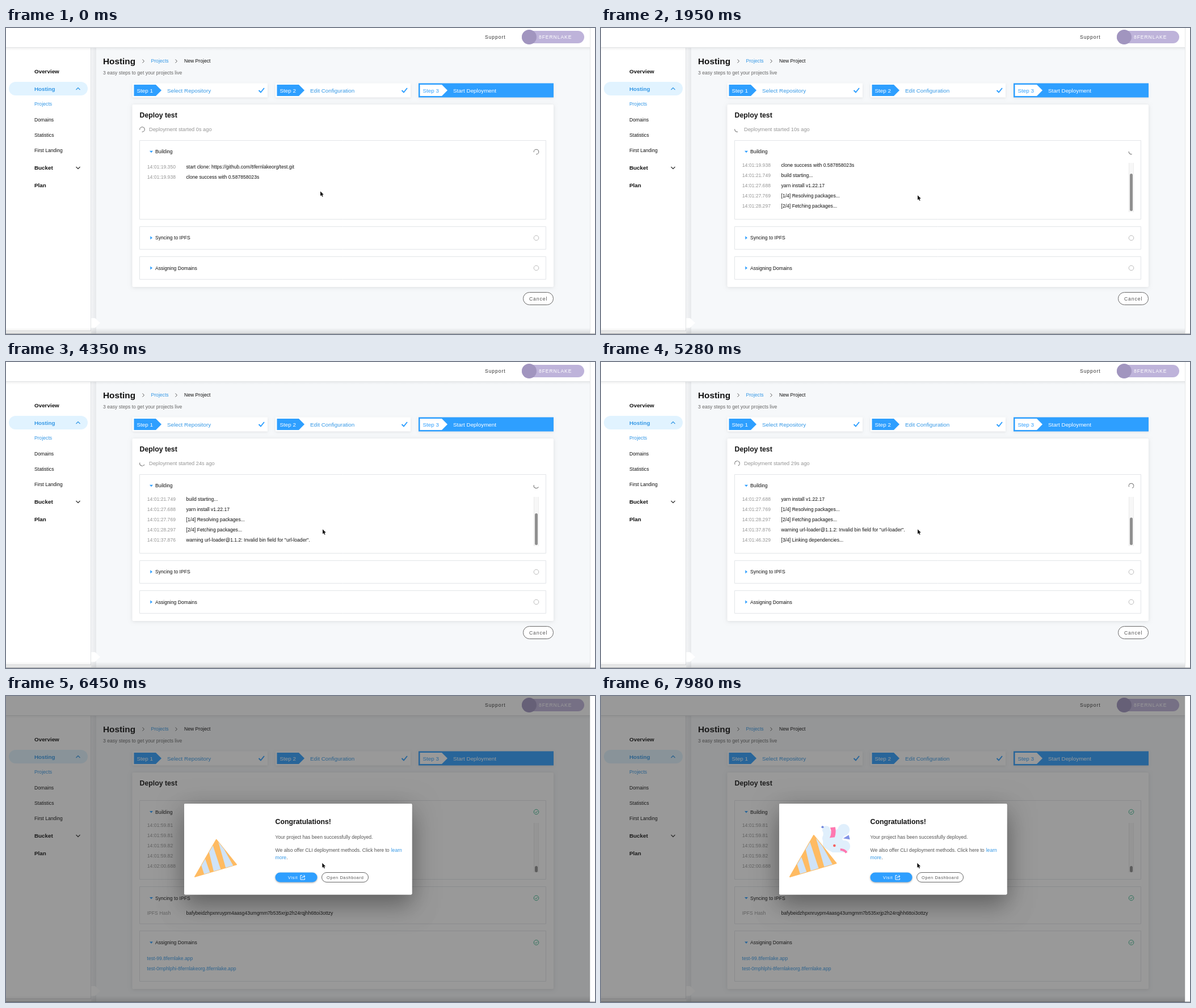
These frames come from a looping animation (1038x540 px, 8000 ms). An HTML page with a canvas:

```html
<!DOCTYPE html>
<html lang="en">
<head>
<meta charset="utf-8">
<title>Deployment</title>
<style>
html, body { margin: 0; width: 100%; height: 100%; overflow: hidden; background: #fff; }
canvas { display: block; width: 100%; height: 100%; }
</style>
</head>
<body>
<canvas id="stage" width="1038" height="540"></canvas>
<script>
const ctx = document.getElementById('stage').getContext('2d');
const LOOP = 8000, STEP = 30, SECOND = 180, DONE = 5550;
const BLUE = '#2e9fff', LINK = '#3598e6', INK = '#111', GREY = '#959595', RULE = '#e2e5e8', GREEN = '#35b58a';
const S = 8.62, M = 9.85, L = 12.3;

const LOG = [
  ['19.350', 'start clone: https://github.com/8fernlakeorg/test.git'],
  ['19.938', 'clone success with 0.587858023s'],
  ['21.749', 'build starting...'],
  ['27.688', 'yarn install v1.22.17'],
  ['27.769', '[1/4] Resolving packages...'],
  ['28.297', '[2/4] Fetching packages...'],
  ['37.876', 'warning url-loader@1.1.2: Invalid bin field for "url-loader".'],
  ['46.329', '[3/4] Linking dependencies...']
];
const LAST_TIMES = ['14:01:59.81', '14:01:59.81', '14:01:59.82', '14:01:59.82', '14:02:00.688'];

const clamp = v => Math.max(0, Math.min(1, v));
const smooth = v => v * v * (3 - 2 * v);

// y is the middle of the capitals
function text(s, x, y, { size = S, color = INK, bold = false, gap = 0 } = {}) {
  ctx.font = `${bold ? 'bold ' : ''}${size}px "Liberation Sans", Arial, sans-serif`;
  ctx.letterSpacing = gap + 'px';
  ctx.fillStyle = color;
  ctx.fillText(s, x, y + size * 0.36);
}

function rect(x, y, w, h, color) {
  ctx.fillStyle = color;
  ctx.fillRect(x, y, w, h);
}

function box(x, y, w, h) {
  ctx.strokeStyle = RULE;
  ctx.lineWidth = 1;
  ctx.strokeRect(x, y, w, h);
}

function round(x, y, w, h, r, fill, stroke) {
  ctx.beginPath();
  ctx.roundRect(x, y, w, h, r);
  if (fill) { ctx.fillStyle = fill; ctx.fill(); }
  if (stroke) { ctx.strokeStyle = stroke; ctx.lineWidth = 1; ctx.stroke(); }
}

function path(points) {
  ctx.beginPath();
  points.forEach(([x, y], i) => i ? ctx.lineTo(x, y) : ctx.moveTo(x, y));
}

function poly(points, color) {
  path(points);
  ctx.closePath();
  ctx.fillStyle = color;
  ctx.fill();
}

function line(points, color, width = 1) {
  path(points);
  ctx.strokeStyle = color;
  ctx.lineWidth = width;
  ctx.stroke();
}

function disc(x, y, r, color) {
  ctx.beginPath();
  ctx.arc(x, y, r, 0, Math.PI * 2);
  ctx.fillStyle = color;
  ctx.fill();
}

function ring(x, y, color) {
  ctx.beginPath();
  ctx.arc(x, y, 4.3, 0, Math.PI * 2);
  ctx.strokeStyle = color;
  ctx.lineWidth = 1;
  ctx.stroke();
}

function shadowed(color, blur, dy, draw) {
  ctx.save();
  ctx.shadowColor = color;
  ctx.shadowBlur = blur;
  ctx.shadowOffsetY = dy;
  draw();
  ctx.restore();
}

function gradient(x0, y0, x1, y1, from, to) {
  const g = ctx.createLinearGradient(x0, y0, x1, y1);
  g.addColorStop(0, from);
  g.addColorStop(1, to);
  return g;
}

function frame() {
  rect(0, 0, 1038, 540, '#fff');
  rect(150, 35, 879, 505, '#f6f8fa');
  rect(150, 35, 9, 505, gradient(150, 0, 159, 0, '#f3f4f6', '#e7e9ec'));
  rect(149, 35, 1, 499, '#e0e2e4');
  poly([[150, 512], [157, 512], [166, 520.5], [157, 529], [150, 529]], '#fff');
  rect(0, 34, 1029, 1, '#dfe1e3');
  rect(0, 35, 1029, 5, gradient(0, 35, 0, 40, 'rgba(0,0,0,.05)', 'rgba(0,0,0,0)'));
  rect(0, 534, 150, 1, '#e0e2e4');
  rect(0, 529, 1029, 11, gradient(0, 529, 0, 540, 'rgba(0,0,0,0)', 'rgba(0,0,0,.13)'));
  rect(1029, 0, 1, 540, '#e6e7e8');
  rect(0, 539, 1038, 1, '#a5a7a9');
}

function header() {
  text('Support', 844, 15.5, { color: '#333', gap: 0.9 });
  round(909, 5, 110, 22, 11, '#beb3da');
  disc(922, 16, 13, '#a195bf');
  text('8FERNLAKE', 939, 15.5, { color: '#fff', gap: 0.9 });
}

function sidebar() {
  round(5, 95, 139, 24, 12, '#e1f3ff');
  const heads = [['Overview', 76], ['Hosting', 107], ['Bucket', 246.5], ['Plan', 277.5]];
  const items = ['Projects', 'Domains', 'Statistics', 'First Landing'];
  heads.forEach(([s, y], i) => text(s, 50, y, { size: M, bold: true, color: i === 1 ? LINK : INK }));
  items.forEach((s, i) => text(s, 50, 134.3 + 27.2 * i, { color: i ? INK : LINK }));
  line([[123.5, 109], [127, 105.5], [130.5, 109]], LINK, 1.2);
  line([[123.5, 245], [127, 248.5], [130.5, 245]], '#333', 1.2);
}

function step(n, label, active) {
  const x = 223 + 252 * (n - 1);
  const w = 238;
  shadowed('rgba(0,0,0,.08)', 4, 1, () => rect(x, 97.5, w, 25, active ? BLUE : '#fff'));
  poly([[x + 2.5, 100], [x + 41, 100], [x + 51, 110], [x + 41, 120], [x + 2.5, 120]], active ? '#fff' : BLUE);
  text('Step ' + n, x + 7.5, 110, { size: M, color: active ? BLUE : '#fff' });
  text(label, x + 61, 110, { size: M, color: active ? '#fff' : LINK });
  if (!active) line([[x + 222.5, 110], [x + 226, 113.5], [x + 232, 106]], BLUE, 2);
}

function heading() {
  text('Hosting', 171, 58, { size: 15.35, bold: true });
  text('Projects', 255.5, 58, { color: LINK });
  text('New Project', 314, 58);
  for (const x of [240.5, 298.5]) line([[x, 55.5], [x + 3, 58.5], [x, 61.5]], '#555', 1);
  text('3 easy steps to get your projects live', 171, 78.5, { color: '#666' });
  step(1, 'Select Repository');
  step(2, 'Edit Configuration');
  step(3, 'Start Deployment', true);
}

function card(bottom) {
  shadowed('rgba(0,0,0,.1)', 6, 1, () => round(222.5, 135, 742.5, bottom - 135, 2, '#fff'));
  text('Deploy test', 235.5, 153.5, { size: L, bold: true });
}

function section(label, top, bottom, mid, open) {
  box(235.5, top, 716, bottom - top);
  poly(open ? [[253, mid - 1.5], [259, mid - 1.5], [256, mid + 2]]
            : [[254.3, mid - 3], [258, mid], [254.3, mid + 3]], BLUE);
  text(label, 263, mid);
}

// Indeterminate ring: a dash that grows, then runs off its end while turning
function spinner(x, y, t) {
  const p = (t / 252 + 0.475) % 1;
  const grow = smooth(clamp(p * 2)), leave = smooth(clamp(p * 2 - 1));
  const from = 15 * grow + 110 * leave;
  const to = Math.min(125.6, from + 1 + 99 * grow);
  const angle = d => (d / 125.66 + 0.75 * p) * Math.PI * 2;
  ctx.beginPath();
  ctx.arc(x, y, 4.3, angle(from), angle(to));
  ctx.strokeStyle = '#777';
  ctx.lineWidth = 1.1;
  ctx.stroke();
}

function scrollbar(top, thumbTop, thumbBottom) {
  rect(930, top, 9, 87, '#f7f7f7');
  rect(930, top, 1, 87, '#e9e9e9');
  rect(938, top, 1, 87, '#eee');
  round(932, thumbTop, 5, thumbBottom - thumbTop, 2.5, '#8f8f8f');
}

function log(t) {
  const now = t / SECOND + 19.5;
  const lines = LOG.filter(([s], i) => i < 2 || +s <= now);
  const extra = Math.max(0, lines.length * 18 - 87);
  ctx.save();
  ctx.beginPath();
  ctx.rect(236, 236, 715, 89);
  ctx.clip();
  lines.forEach(([s, msg], i) => {
    const y = 244.5 + 18 * i - extra;
    if (y < 236) return;
    text('14:01:' + s, 248.7, y, { color: GREY });
    text(msg, 317.5, y);
  });
  ctx.restore();
  if (extra) scrollbar(238, 323 - (87 * 87 / (87 + extra) - 4), 323);
}

function running(t) {
  card(457);
  spinner(240, 179, t);
  text(`Deployment started ${Math.floor(t / SECOND)}s ago`, 252, 179, { size: 9.25, color: GREY });
  section('Building', 198.5, 337.5, 218.3, true);
  spinner(934.5, 218.5, t);
  log(t);
  section('Syncing to IPFS', 350.5, 390.5, 370.3);
  section('Assigning Domains', 403.5, 443.5, 423.5);
  ring(934.5, 370.5, '#bbb');
  ring(934.5, 423.5, '#bbb');
  round(911.5, 466.5, 53, 22, 11, '#fff', '#666');
  text('Cancel', 922, 477.5, { color: '#555', gap: 0.9 });
}

function finished() {
  card(517);
  section('Building', 184.5, 323.5, 204.5, true);
  LAST_TIMES.forEach((s, i) => text(s, 248.7, 227.5 + 18 * i, { color: GREY }));
  scrollbar(224, 300, 311);
  section('Syncing to IPFS', 336.5, 402, 356.5, true);
  text('IPFS Hash', 248.7, 382.5, { color: GREY });
  text('bafybeidzhpxnruypm4aasg43umgmm7b535xrjp2h24rqjhh6ttoi3ottzy', 317.5, 382.5);
  section('Assigning Domains', 414.5, 503.5, 435, true);
  text('test-99.8fernlake.app', 248.5, 463, { color: LINK });
  text('test-0mphlphi-8fernlakeorg.8fernlake.app', 248.5, 481, { color: LINK });
  for (const y of [204.5, 356.5, 435]) {
    ring(934.5, y, GREEN);
    line([[932.4, y], [934, y + 1.7], [936.8, y - 1.4]], GREEN, 1);
  }
}

function scaled(x, y, k, draw) {
  ctx.save();
  ctx.translate(x, y);
  ctx.scale(k, k);
  ctx.translate(-x, -y);
  draw();
  ctx.restore();
}

function burst() {
  const pale = '#e0effc';
  poly([[391, 266], [392, 233], [410, 240], [420, 232], [437, 238], [424, 252], [438, 262], [428, 276], [408, 276]], pale);
  for (const [x, y, r] of [[397, 236, 7], [428, 236, 10.5], [429, 265, 10.5], [408, 260, 14], [399, 251, 9], [416, 247, 11]]) {
    disc(x, y, r, pale);
  }
  ctx.beginPath();
  ctx.moveTo(404, 232);
  ctx.quadraticCurveTo(408, 241, 403, 250);
  ctx.lineTo(412, 249);
  ctx.quadraticCurveTo(415, 240, 413, 231);
  ctx.fillStyle = '#ff78b0';
  ctx.fill();
  ctx.beginPath();
  ctx.moveTo(422, 271);
  ctx.quadraticCurveTo(429, 271, 433, 276.5);
  ctx.strokeStyle = '#ff78b0';
  ctx.lineWidth = 4;
  ctx.stroke();
  poly([[427, 251], [437, 245], [439, 253]], '#8193e6');
  disc(390.5, 231, 2.1, '#7288dc');
  disc(411.5, 264, 2.3, '#f5605f');
}

function cone() {
  const left = s => [333 + 42 * s, 319 - 73 * s];
  const base = s => [333 + 81.5 * s, 319 - 24 * s];
  const mouth = s => [375 + 39.5 * s, 246 + 49 * s];
  const body = [left(0), left(1), mouth(1)];
  poly(body, '#ffbb62');
  ctx.strokeStyle = '#ffbb62';
  ctx.lineWidth = 2;
  ctx.lineJoin = 'round';
  ctx.stroke();
  poly([left(0.3), left(0.48), base(0.36), base(0.22)], '#cfe3f8');
  poly([left(0.66), left(0.84), base(0.62), base(0.45)], '#cfe3f8');
  poly([mouth(0.1), mouth(0.38), base(0.92), base(0.74)], '#cfe3f8');
}

function popper(t) {
  const settle = (start, tau) => t > start ? 1 - Math.exp((start - t) / tau) : 0;
  const open = settle(6450, 300), size = settle(5880, 250);
  if (open) scaled(387, 277, open, burst);
  if (size) scaled(333, 319, size, cone);
}

function dialog(t) {
  ctx.globalAlpha = clamp((t - DONE + STEP) / 120);
  rect(0, 0, 1029, 540, 'rgba(33,33,33,.46)');
  const sheet = () => round(314, 190, 401.5, 160.5, 2, '#fff');
  shadowed('rgba(0,0,0,.28)', 46, 9, sheet);
  shadowed('rgba(0,0,0,.16)', 38, 24, sheet);
  popper(t);
  text('Congratulations!', 474.5, 221.5, { size: L, bold: true });
  const soft = { color: '#555' };
  text('Your project has been successfully deployed.', 474.5, 249.3, soft);
  text('We also offer CLI deployment methods. Click here to', 474.5, 272.2, soft);
  text('learn', 678.7, 272.2, { color: LINK });
  text('more', 474.5, 285.2, { color: LINK });
  text('.', 494.3, 285.2, soft);
  shadowed('rgba(0,0,0,.35)', 3, 1, () => round(474.5, 311.5, 74, 17, 8.5, BLUE));
  text('Visit', 497, 320.2, { size: 7.4, color: '#fff', gap: 0.7 });
  line([[522, 316.5], [519, 316.5], [519, 324], [526.5, 324], [526.5, 321.5]], '#fff', 1);
  line([[521.5, 321.5], [522.5, 319], [526.8, 318.2]], '#fff', 1);
  line([[524.5, 315.8], [527, 318.2], [524.5, 320.6]], '#fff', 1);
  round(556.5, 311.5, 82, 17, 8.5, '#fff', '#666');
  text('Open Dashboard', 565, 320.2, { size: 7.4, color: '#555', gap: 0.65 });
  ctx.globalAlpha = 1;
}

function cursor(t) {
  const k = smooth(clamp(t / 600));
  const x = 554 + 4 * k - (t >= DONE ? 0.7 : 0), y = 288.3 + 7 * k - (t >= DONE ? 0.5 : 0);
  const shape = [[0, 0], [0, 8.2], [1.9, 6.5], [3.2, 9.5], [4.6, 8.9], [3.3, 6], [5.8, 5.8]];
  const points = shape.map(([a, b]) => [x + a, y + b]);
  poly(points, '#111');
  ctx.strokeStyle = '#fff';
  ctx.lineWidth = 1.4;
  ctx.lineJoin = 'round';
  ctx.stroke();
  ctx.fill();
}

function draw(t) {
  frame();
  header();
  sidebar();
  heading();
  if (t < DONE) {
    running(t);
  } else {
    finished();
    dialog(t);
  }
  cursor(t);
}

const start = performance.now();
function tick() {
  const t = (performance.now() - start) % LOOP;
  draw(Math.floor(t / STEP) * STEP);
  requestAnimationFrame(tick);
}
tick();
</script>
</body>
</html>
```
